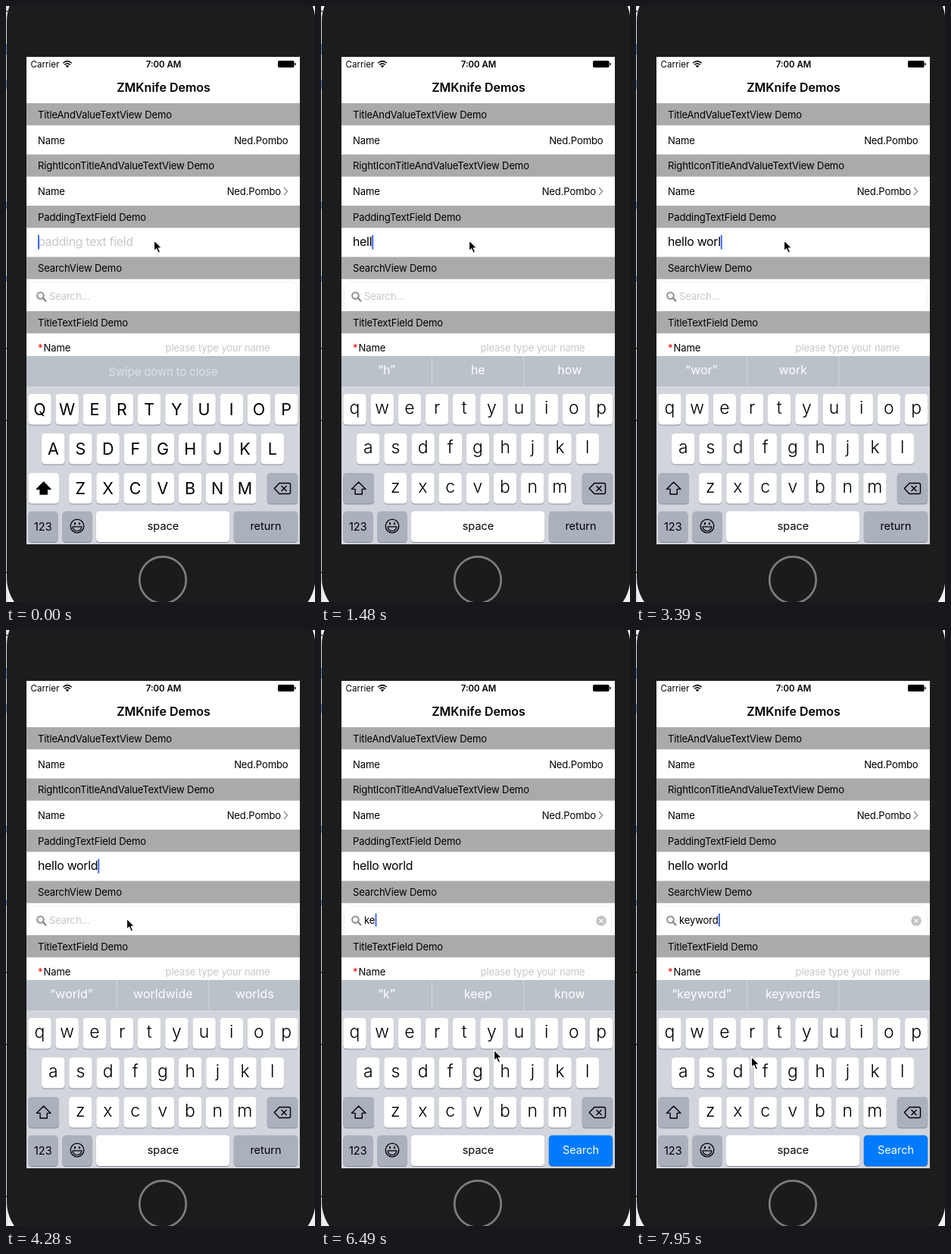
An HTML page for the animation above (8 s loop, 408 px wide and 785 px high).

```html
<!DOCTYPE html>
<html lang="en">
<head>
<meta charset="utf-8">
<title>Text field demos</title>
<style>
html, body { margin: 0; width: 100%; height: 100%; overflow: hidden; background: #f4f4f4; }
svg { display: block; width: 408px; height: 785px; }
text { font-family: Inter, Roboto, "Liberation Sans", sans-serif; }
.body { font-size: 13.1px; letter-spacing: -.012em; }
.field { font-size: 15.9px; letter-spacing: -.018em; }
.hint { fill: #c7c7cd; }
.key { font-size: 14.5px; }
.pred { font-size: 16px; fill: #fff; }
.upper { font-size: 21.5px; }
.lower { font-size: 23px; font-weight: 350; transform: translateY(-1.5px); }
.mid { text-anchor: middle; }
.end { text-anchor: end; }
</style>
</head>
<body>
<svg id="stage" viewBox="0 0 408 785" xmlns="http://www.w3.org/2000/svg"></svg>
<script>
const LOOP = 8000;
const GREY = '#abb0bd';
const stage = document.getElementById('stage');

const rect = (x, y, w, h, fill, more = '') =>
  `<rect x="${x}" y="${y}" width="${w}" height="${h}" fill="${fill}" ${more}/>`;
const text = (x, y, str, cls = 'body', more = '') =>
  `<text x="${x}" y="${y}" class="${cls}" ${more}>${str}</text>`;
const line = (d, width = 1.5, color = '#000', more = '') =>
  `<path d="${d}" fill="none" stroke="${color}" stroke-width="${width}" ${more}/>`;
const keycap = (x, y, w, fill, id = '') =>
  rect(x, y + 1, w, 40.5, '#888b91', 'rx="4.5"') +
  rect(x, y, w, 40.5, fill, `rx="4.5" ${id && `id="${id}"`}`);

function phone() {
  const patches = [[50, 14], [97, 12], [258, 9], [355, 8]];
  const ticks = [6, 450, 545, 745];
  return rect(0, 0, 408, 785, '#f0f0f0') + rect(0, 0, 2, 785, '#dde1e6') +
    patches.map(([y, h]) => rect(0, y, 2, h, '#5f91cc')).join('') +
    ticks.map(y => rect(0, y, 2, 2, '#555')).join('') +
    rect(1, -36, 407.5, 845, '#1c1c1c', 'rx="56"') +
    '<circle cx="207" cy="756" r="30.7" fill="#1b1b1b" stroke="#7d7d7d" stroke-width="2.7"/>' +
    rect(27, 67, 361, 642, '#fff');
}

function statusBar() {
  return text(32.5, 80.7, 'Carrier', '', 'font-size="11.6"') +
    line('M75.3 75.3Q81 70 86.7 75.3M77.3 77.5Q81 74 84.7 77.5', 1.5) +
    '<path d="M78.8 78.9Q81 77 83.2 78.9L81 81.2Z"/>' +
    text(208, 80.7, '7:00 AM', 'mid', 'font-size="11.4" font-weight="600"') +
    rect(359, 72, 21.5, 9, '#000', 'rx="1.8"') +
    '<path d="M381.3 74.8Q383 75 383 76.5T381.3 78.2Z"/>' +
    text(208, 113, 'ZMKnife Demos', 'mid', 'font-size="16" font-weight="600"');
}

function form() {
  const heads = [
    [128, 'TitleAndValueTextView'], [195.5, 'RightIconTitleAndValueTextView'],
    [263, 'PaddingTextField'], [330.5, 'SearchView'], [402, 'TitleTextField']
  ];
  return heads.map(([y, name]) =>
      rect(27, y, 361, 29.2, '#aaa') + text(42, y + 19.6, name + ' Demo')).join('') +
    text(42, 181.7, 'Name') + text(372.5, 181.7, 'Ned.Pombo', 'body end') +
    text(42, 249, 'Name') + text(363, 249, 'Ned.Pombo', 'body end') +
    line('M367 239L371.7 244L367 249', 1.4, '#8e8e93') +
    text(42, 316.3, '', 'field', 'id="pad"') +
    rect(30.5, 363.5, 353.5, 38, '#fff', 'rx="8" stroke="#f0f0f0"') +
    '<circle cx="45.5" cy="381.5" r="4.3" fill="none" stroke="#8e8e93" stroke-width="2"/>' +
    line('M48.7 384.7L52.4 388.4', 2.4, '#8e8e93', 'stroke-linecap="round"') +
    text(57, 387.3, '', 'body', 'id="search"') +
    '<g id="clear"><circle cx="370" cy="383" r="6.8" fill="#c2c2c6"/>' +
    line('M367.4 380.4L372.6 385.6M372.6 380.4L367.4 385.6', 1.3, '#fff') + '</g>' +
    text(42, 455, '*', 'body', 'fill="#f00"') + text(49.5, 455, 'Name') +
    text(348.5, 454.7, 'please type your name', 'body hint end') +
    rect(0, 0, 2, 19, '#426bf2', 'id="caret"');
}

function keyboard() {
  const rows = [['QWERTYUIOP', 44.5, 511], ['ASDFGHJKL', 62.3, 563], ['ZXCVBNM', 98.3, 615]];
  const letters = rows.map(([chars, x0, y]) => [...chars].map((c, i) => {
    const x = x0 + i * 36.18;
    return keycap(x - 15.2, y, 30.4, '#fff') + text(x, y + 27.5, c, 'mid letter');
  }).join('')).join('');
  const bottom = 665.5;
  return rect(27, 461, 361, 248, '#d2d5db') + rect(27, 461, 361, 40, '#bac1c9') +
    '<g id="preds">' + line('M146.5 461V501M268 461V501', 1, '#d2d6dc') +
    [86.5, 207.3, 328.3].map((x, i) => text(x, 485.3, '', 'pred mid', `id="pred${i}"`)).join('') +
    '</g>' +
    text(207.5, 486.5, 'Swipe down to close', 'mid', 'id="swipe" font-size="15" fill="#dde1e5" letter-spacing="-.15"') +
    letters +
    keycap(29.5, 615, 40.5, GREY, 'shift') +
    '<path id="arrow" d="M49.7 627L59 636.4H54.3V643H45.1V636.4H40.4Z" stroke="#000" stroke-width="1.4" stroke-linejoin="round"/>' +
    keycap(344.8, 615, 40.4, GREY) +
    line('M361 628.5H373.5Q375.5 628.5 375.5 630.5V640.5Q375.5 642.5 373.5 642.5H361L354.3 635.5Z', 1.4, '#000', 'stroke-linejoin="round"') +
    line('M363.5 632L370.5 639M370.5 632L363.5 639', 1.4) +
    keycap(29.5, bottom, 39, GREY) + text(48.8, 690.5, '123', 'key mid') +
    keycap(74.5, bottom, 39.2, GREY) +
    '<circle cx="94" cy="685" r="8.8" fill="none" stroke="#000" stroke-width="1.3"/>' +
    '<ellipse cx="91" cy="681.7" rx="1.1" ry="1.8"/><ellipse cx="97" cy="681.7" rx="1.1" ry="1.8"/>' +
    line('M88 685.9H100Q99 691.5 94 691.5T88 685.9Z', 1.2, '#000', 'stroke-linejoin="round"') +
    keycap(119, bottom, 176.3, '#fff') + text(207.5, 689.7, 'space', 'key mid') +
    keycap(300.8, bottom, 84.4, GREY, 'action') + text(343, 689.7, '', 'key mid', 'id="actionText"');
}

const pointer =
  '<path id="pointer" d="M0 0V14.2L3.2 11.3L5.6 16.8L8.2 15.7L5.8 10.3H10.2Z" stroke="#fff" stroke-width="1.2" stroke-linejoin="round"/>';

stage.innerHTML = phone() + statusBar() + form() + keyboard() + pointer;
const $ = id => document.getElementById(id);
const letterNodes = [...document.querySelectorAll('.letter')];

const start = {
  pad: '', search: '', focus: 'pad', caret: 1, caps: true, preds: null, action: 'return', at: [195.5, 308.5]
};

// Each event overrides part of the state; "~" marks a letter still fading in.
const events = [
  [290, { caret: .45 }], [440, { caret: 0 }], [740, { caret: .6 }],
  [890, { pad: 'h', caret: 1, caps: false, preds: ['', '', ''] }],
  [1040, { pad: 'he' }],
  [1180, { preds: ['“h”', 'he', 'how'] }],
  [1330, { pad: 'hel' }], [1480, { pad: 'hell' }],
  [1620, { preds: ['“hell”', 'he’ll', ''] }],
  [1770, { pad: 'hello' }],
  [1920, { preds: ['“hello”', '', ''] }],
  [2210, { pad: 'hello ' }],
  [2350, { preds: ['~m~y', '~t~h~e~r~e', '~I'] }],
  [2500, { pad: 'hello w', preds: ['~my', 'the~re', 'I'] }],
  [2650, { preds: ['“w”', 'we', ''] }],
  [2800, { pad: 'hello wo' }], [2940, { pad: 'hello wor' }],
  [3090, { preds: ['“wor”', 'work', ''] }],
  [3390, { pad: 'hello worl' }], [3540, { pad: 'hello world' }],
  [3690, { preds: ['“world”', 'worldwide', 'worlds'] }],
  [3830, { at: [192, 320] }], [3980, { at: [179, 348] }],
  [4130, { at: [165, 373] }], [4280, { at: [159.5, 380] }],
  [4580, { focus: 'search', preds: ['', '', ''] }],
  [4730, { caps: true, action: 'Search', preds: ['I', 'The', 'Hello'] }],
  [4870, { at: [207, 440] }], [5020, { at: [247.5, 497] }],
  [5170, { at: [236, 540] }], [5310, { at: [228.5, 553] }],
  [5610, { caret: .45 }], [5760, { caret: 0 }], [6050, { caret: .6 }],
  [6200, { search: 'k', caret: 1, caps: false, preds: ['', '', ''] }],
  [6340, { preds: ['“k”', 'keep', 'know'] }],
  [6490, { search: 'ke' }],
  [6640, { preds: ['“ke”', 'keep', 'key'] }],
  [6780, { search: 'key' }],
  [6930, { preds: ['“~k~e~y”', 'keys', 'keyboard'] }],
  [7210, { search: 'keyw', preds: ['“key”', 'keys', 'keyboard'] }],
  [7510, { search: 'keywo', at: [215, 555] }],
  [7660, { search: 'keywor', at: [187, 559], preds: ['', '', ''] }],
  [7800, { search: 'keyword', at: [163, 561] }],
  [7950, { at: [152.5, 562], preds: ['“keyword”', 'keywords', ''] }]
];

const hints = { pad: 'padding text field', search: 'Search...' };

function setField(id, value) {
  const node = $(id);
  node.textContent = (value || hints[id]).replace(/ /g, '\u00a0');
  node.classList.toggle('hint', !value);
}

function draw(s) {
  setField('pad', s.pad);
  setField('search', s.search);
  $('clear').style.display = s.search ? '' : 'none';

  const inPad = s.focus === 'pad';
  const width = s[s.focus] ? $(s.focus).getComputedTextLength() : 0;
  const caret = $('caret');
  caret.setAttribute('x', (inPad ? 42 : 57.3) + width);
  caret.setAttribute('y', inPad ? 301.5 : 373.5);
  caret.setAttribute('height', inPad ? 19 : 17);
  caret.setAttribute('opacity', s.caret);

  $('swipe').style.display = s.preds ? 'none' : '';
  $('preds').style.display = s.preds ? '' : 'none';
  (s.preds || []).forEach((word, i) => {
    $('pred' + i).innerHTML = word.replace(/~(.)/g, '<tspan fill-opacity=".6">$1</tspan>');
  });

  for (const node of letterNodes) {
    const c = node.textContent;
    node.textContent = s.caps ? c.toUpperCase() : c.toLowerCase();
    node.setAttribute('class', 'mid letter ' + (s.caps ? 'upper' : 'lower'));
  }
  $('shift').setAttribute('fill', s.caps ? '#fff' : GREY);
  $('arrow').setAttribute('fill', s.caps ? '#000' : 'none');

  const blue = s.action === 'Search';
  $('action').setAttribute('fill', blue ? '#007aff' : GREY);
  $('actionText').setAttribute('fill', blue ? '#fff' : '#000');
  $('actionText').textContent = s.action;
  $('pointer').setAttribute('transform', `translate(${s.at})`);
}

let shown = -1;
const begin = performance.now();
function frame() {
  const t = (performance.now() - begin) % LOOP;
  const past = events.filter(e => e[0] <= t);
  if (past.length !== shown) {
    shown = past.length;
    draw(Object.assign({}, start, ...past.map(e => e[1])));
  }
  requestAnimationFrame(frame);
}
frame();
</script>
</body>
</html>
```
